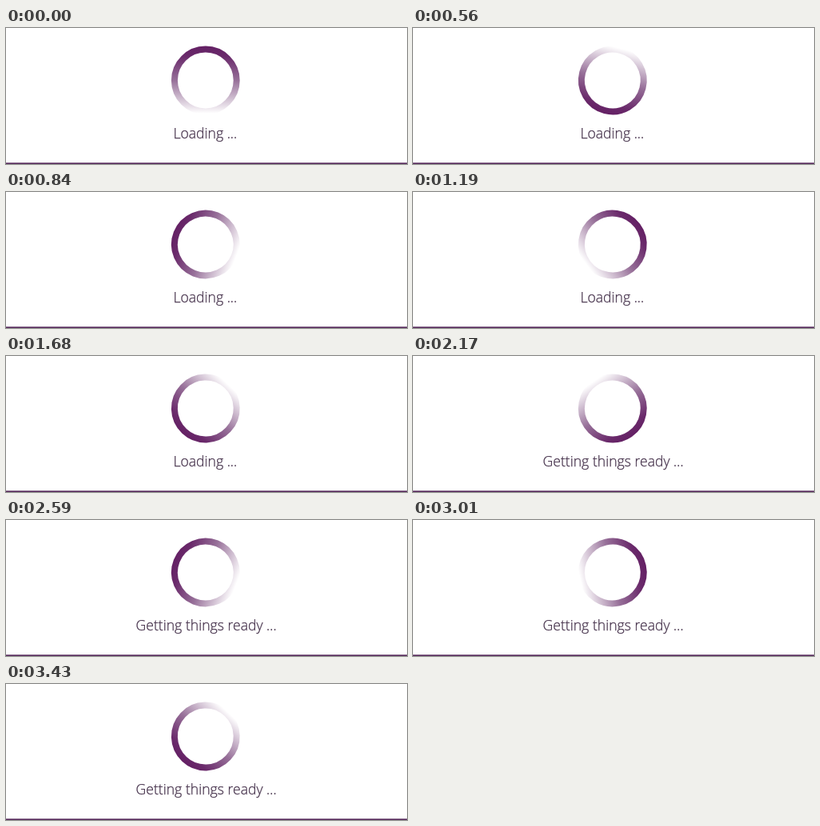
Animation, 502 px wide and 170 px high, one loop 3.5 s. Source, as an HTML page:

```html
<!DOCTYPE html>
<html lang="en">
<head>
<meta charset="utf-8">
<title>Loading</title>
<style>
  html, body { margin: 0; width: 100%; height: 100%; overflow: hidden; background: #fff; }
  svg { display: block; width: 100%; height: 100%; }
  text {
    font: 300 17.6px "Open Sans", "Noto Sans", sans-serif;
    fill: #44304a; stroke: #44304a; stroke-width: .25px;
  }
</style>
</head>
<body>
<svg viewBox="0 0 502 170">
  <defs>
    <linearGradient id="fade" gradientUnits="userSpaceOnUse" x1="0" y1="-43" x2="0" y2="43">
      <stop offset="0" stop-color="#642064"/>
      <stop offset=".15" stop-color="#6a2a6b"/>
      <stop offset=".5" stop-color="#977099"/>
      <stop offset=".82" stop-color="#dccfdd"/>
      <stop offset=".98" stop-color="#fff"/>
    </linearGradient>
  </defs>
  <g transform="translate(249.8 65.5)">
    <circle id="ring" r="38.9" fill="none" stroke="url(#fade)" stroke-width="8"/>
  </g>
  <text id="label" y="138"></text>
  <rect y="168.4" width="502" height="1.6" fill="#55285a"/>
</svg>
<script>
  const STEP = 70;        // ms per pose
  const STEPS = 25;       // poses per message
  const TURN = 24.3;      // degrees per pose
  const messages = [
    { text: "Loading ...", x: 209.4 },
    { text: "Getting things ready ...", x: 162.6 }
  ];
  const ring = document.getElementById("ring");
  const label = document.getElementById("label");
  let shown = null;

  function draw(ms) {
    const pose = Math.floor(ms / STEP) % (STEPS * messages.length);
    const message = messages[Math.floor(pose / STEPS)];
    ring.setAttribute("transform", `rotate(${(pose % STEPS) * TURN})`);
    if (message !== shown) {
      shown = message;
      label.textContent = message.text;
      label.setAttribute("x", message.x);
    }
  }

  const start = performance.now();
  function tick() {
    draw(performance.now() - start);
    requestAnimationFrame(tick);
  }
  draw(0);
  requestAnimationFrame(tick);
</script>
</body>
</html>
```
